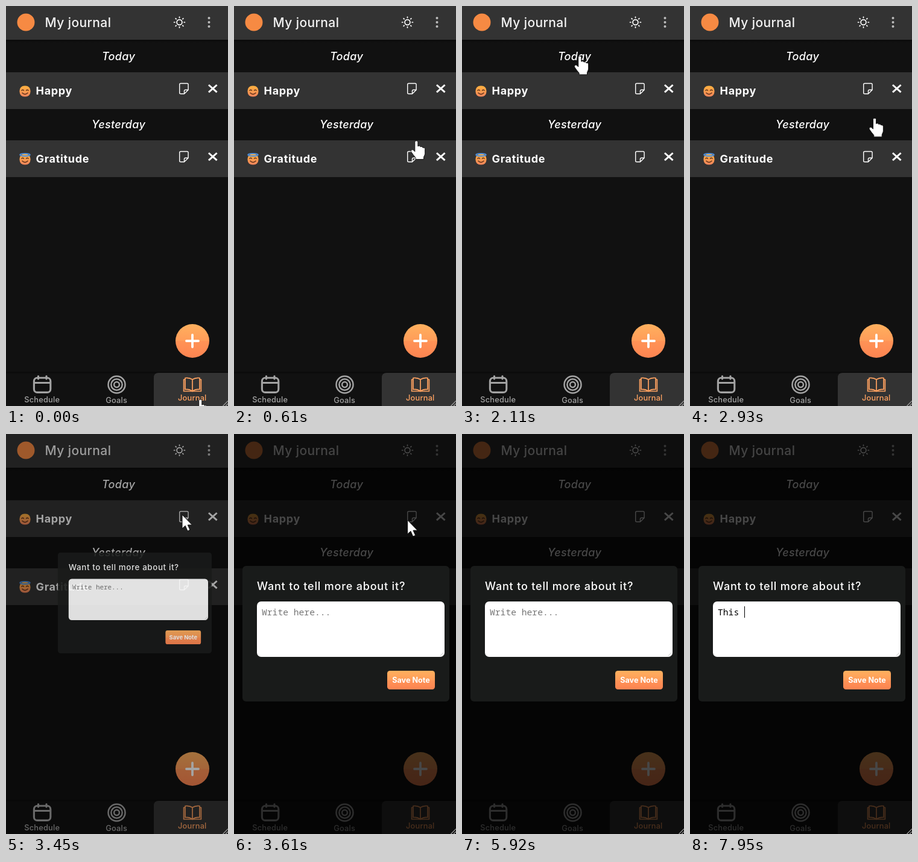
An HTML page that plays this animation: 368x664 px, repeating every 8000 ms.

```html
<!DOCTYPE html>
<html lang="en">
<head>
<meta charset="utf-8">
<title>Journal</title>
<style>
  html, body { margin: 0; width: 100%; height: 100%; overflow: hidden; background: #111; }
  svg { display: block; width: 100vw; height: 100vh; }
  text { font-family: Inter, "Open Sans", sans-serif; font-weight: 500; fill: #fff; }
  .title { font-size: 21px; letter-spacing: .4px; fill: #f4f4f4; }
  .day { font-size: 18px; font-style: italic; letter-spacing: .3px; text-anchor: middle; }
  .mood { font-size: 18px; font-weight: 700; letter-spacing: .7px; }
  .tab { font-size: 12.8px; letter-spacing: .2px; text-anchor: middle; fill: #a3a3a3; }
  .ask { font-size: 18px; letter-spacing: .82px; }
  .save { font-size: 12.6px; font-weight: 700; text-anchor: middle; }
  .mono { font-family: "Noto Sans Mono", "DejaVu Sans Mono", monospace; font-size: 14.667px; font-weight: 400; }
  .line { fill: none; stroke: #fff; }
</style>
</head>
<body>
<svg viewBox="0 0 368 664" xmlns="http://www.w3.org/2000/svg">
  <defs>
    <linearGradient id="warm" x1="0" y1="0" x2="0" y2="1">
      <stop offset="0" stop-color="#ffb05e"/>
      <stop offset=".5" stop-color="#ff9c59"/>
      <stop offset=".5" stop-color="#ff9356"/>
      <stop offset="1" stop-color="#fd8451"/>
    </linearGradient>
    <linearGradient id="skin" x1="0" y1="0" x2="0" y2="1">
      <stop offset="0" stop-color="#fdb23f"/>
      <stop offset="1" stop-color="#f3845c"/>
    </linearGradient>
    <linearGradient id="shade" x1="0" y1="0" x2="0" y2="1">
      <stop offset="0" stop-color="#000" stop-opacity=".4"/>
      <stop offset="1" stop-color="#000" stop-opacity="0"/>
    </linearGradient>
    <path id="cross" class="line" stroke-width="3" d="M336 131L349.6 143.2M349.6 131L336 143.2"/>
    <path id="note" class="line" stroke-width="1.4" stroke-linejoin="round" d="M295.5 145.7H289.5Q287.7 145.7 287.7 143.9V130.3Q287.7 128.5 289.5 128.5H300.3Q302.1 128.5 302.1 130.3V139.2L295.5 145.7V141Q295.5 139.2 297.3 139.2H302.1"/>
    <g id="face">
      <rect x="22.5" y="132.5" width="18" height="18" rx="8" fill="url(#skin)"/>
      <g fill="none" stroke="#5a2d17" stroke-width="1.4" stroke-linecap="round">
        <path d="M26 140.2q1.7-2.2 3.4 0M33.6 140.2q1.7-2.2 3.4 0M27 144.3q4.5 4.4 9 0"/>
      </g>
    </g>
    <path id="bar" d="M-6-11.5H-2Q0-11.5 0-10Q0-11.5 2-11.5H6M0-10V10M-6 11.5H-2Q0 11.5 0 10Q0 11.5 2 11.5H6"/>
  </defs>

  <rect width="368" height="664" fill="#111"/>
  <rect y="56" width="368" height="5" fill="url(#shade)"/>
  <rect width="368" height="56" fill="#333"/>
  <circle cx="33" cy="27" r="14.5" fill="#f68a43"/>
  <text class="title" x="64.5" y="35">My journal</text>
  <g class="line" stroke-width="1.7" stroke-linecap="round">
    <circle cx="287.5" cy="27" r="4.4"/>
    <g id="rays"></g>
  </g>
  <g fill="#bdbdbd">
    <circle cx="336.5" cy="20" r="2"/><circle cx="336.5" cy="27" r="2"/><circle cx="336.5" cy="34" r="2"/>
  </g>

  <text class="day" x="186.5" y="90">Today</text>
  <text class="day" x="186.5" y="203">Yesterday</text>
  <rect y="110" width="368" height="61" fill="#333"/>
  <rect y="223" width="368" height="61" fill="#333"/>
  <use href="#face"/>
  <use href="#face" y="113"/>
  <ellipse cx="31.5" cy="247" rx="8.3" ry="2.1" fill="none" stroke="#4d8fdc" stroke-width="2"/>
  <text class="mood" x="49.5" y="147">Happy</text>
  <text class="mood" x="49.5" y="260">Gratitude</text>
  <use href="#note"/><use href="#note" y="113"/>
  <use href="#cross"/><use href="#cross" y="113"/>

  <circle cx="309" cy="556" r="28" fill="url(#warm)"/>
  <path class="line" stroke-width="3.8" stroke-linecap="round" d="M299 556H319M309 546V566"/>

  <rect y="607" width="368" height="3" fill="#0c0c0c"/>
  <path d="M245 664V617Q245 609 253 609H368V664Z" fill="#333"/>
  <g fill="none" stroke="#a3a3a3" stroke-width="3.1" stroke-linecap="round">
    <rect x="46.4" y="617.2" width="27.4" height="24.2" rx="5.5"/>
    <path d="M47 625.5H73M53.5 614.5V619M67 614.5V619"/>
    <g stroke-width="2.5">
      <circle cx="183.5" cy="628.5" r="14"/><circle cx="183.5" cy="628.5" r="9.2"/><circle cx="183.5" cy="628.5" r="4.4"/>
    </g>
  </g>
  <g fill="none" stroke="#ffa261" stroke-width="1.7" stroke-linejoin="round">
    <path d="M309 620Q304 616.5 297 617.5V636.5Q304 635.5 309 639.5Q314 635.5 321 636.5V617.5Q314 616.5 309 620V639"/>
    <path d="M297 620H294.6V639.5H323.4V620H321"/>
  </g>
  <text class="tab" x="59.7" y="658">Schedule</text>
  <text class="tab" x="183.2" y="659">Goals</text>
  <text class="tab" x="308.8" y="655" style="fill:#ffa261">Journal</text>

  <rect id="dim" width="368" height="664" fill="#000"/>
  <path d="M359.5 664L368 655.5M364 664L368 660" stroke="#a0a0a0" stroke-width="1.2"/>

  <g id="dialog">
    <rect x="14" y="219" width="343" height="225" rx="6" fill="#191b1a"/>
    <text class="ask" x="38" y="259">Want to tell more about it?</text>
    <rect x="38" y="278" width="311" height="92" rx="7" fill="#fff"/>
    <path d="M341.5 368.5L347.5 362.5M345 368.5L347.5 366" stroke="#bbb" stroke-width=".8"/>
    <text id="entry" class="mono" x="46" y="301"></text>
    <rect id="caret" x="90" y="286" width="1" height="19" fill="#000"/>
    <rect x="254" y="393" width="79" height="31" rx="4.5" fill="url(#warm)"/>
    <text class="save" x="293.5" y="413">Save Note</text>
  </g>

  <g id="cursor" fill="#fff" stroke="#111" stroke-width="1" stroke-linejoin="round">
    <path id="hand" d="M-2.3 2.3C-2.3-.6 2.8-.6 2.8 2.3V9.2C4.3 7.9 6.6 8.5 7 10.2C8.5 9.2 10.5 10 10.8 11.6C12.6 10.9 14.6 12 14.6 14V21C14.6 24 12.4 25.8 12.4 28V31H-1V28.3C-3.5 25.5-6 22-8.2 18.8C-9.8 16.2-6.9 13.7-4.6 15.7L-2.3 18Z"/>
    <path id="arrow" d="M0 0V23L5.2 18.3L9 27L13 25.3L9.3 17H16.5Z"/>
    <g id="beam" fill="none">
      <use href="#bar" stroke-width="3"/>
      <use href="#bar" stroke="#fff" stroke-width="1.5"/>
    </g>
  </g>
</svg>
<script>
  const LOOP = 8000;
  const OPEN = 3336, OPEN_TIME = 233;
  const BUTTON = [294.5, 132];
  const DIM = .72;
  const CHAR = 8.8;
  const keys = [[7330, "T"], [7540, "h"], [7700, "i"], [7870, "s"], [7950, " "]];

  // Pointer stops: time, x, y
  const path = [
    [0, 322, 653], [810, 289, 147], [1230, 166, 188], [1400, 162, 201],
    [1660, 169, 197], [2110, 195, 83], [2250, 207, 80], [2510, 271, 103],
    [2900, 306, 187], [3320, 292, 134], [3520, 292, 134], [4040, 239, 245]
  ];

  const $ = id => document.getElementById(id);
  const clamp = v => Math.min(1, Math.max(0, v));
  const show = (id, on) => $(id).setAttribute("visibility", on ? "visible" : "hidden");

  $("rays").innerHTML = Array.from({ length: 8 }, (_, i) =>
    `<path d="M0 -7.6V-9" transform="translate(287.5 27) rotate(${i * 45})"/>`).join("");

  function slope(i, axis) {
    const a = path[i - 1], b = path[i], c = path[i + 1];
    if (!a || !c) return 0;
    const before = (b[axis] - a[axis]) / (b[0] - a[0]);
    const after = (c[axis] - b[axis]) / (c[0] - b[0]);
    // Flat at turning points, so the pointer never overshoots a stop
    return before * after <= 0 ? 0 : 2 * before * after / (before + after);
  }

  function pointer(t, axis) {
    const last = path.length - 1;
    if (t >= path[last][0]) return path[last][axis];
    const i = path.findIndex(p => p[0] > t) - 1;
    const a = path[i], b = path[i + 1];
    const d = b[0] - a[0], u = (t - a[0]) / d, v = 1 - u;
    return v * v * (1 + 2 * u) * a[axis] + u * u * (3 - 2 * u) * b[axis]
      + d * u * v * (v * slope(i, axis) - u * slope(i + 1, axis));
  }

  function drawDialog(t) {
    const p = clamp((t - OPEN) / OPEN_TIME);
    const scale = 1 - (1 - p) ** 2;
    const [x, y] = BUTTON;
    $("dim").setAttribute("opacity", DIM * p);
    $("dialog").setAttribute("opacity", 1 - (1 - p) ** 3);
    $("dialog").setAttribute("transform", `translate(${x} ${y}) scale(${scale}) translate(${-x} ${-y})`);
  }

  function drawEntry(t) {
    const typed = keys.filter(k => k[0] <= t).map(k => k[1]).join("");
    $("entry").textContent = typed || "Write here...";
    $("entry").style.fill = typed ? "#000" : "#757575";
    $("caret").setAttribute("x", 46 + typed.length * CHAR);
    show("caret", (t >= 6020 && t < 6550) || t >= 7100);
  }

  function drawCursor(t) {
    const beam = t >= 4570 && t < 5150;
    const x = beam ? 240 : pointer(t, 1), y = beam ? 246.5 : pointer(t, 2);
    $("cursor").setAttribute("transform", `translate(${x} ${y})`);
    show("hand", t < OPEN);
    show("arrow", t >= OPEN && t < 4570);
    show("beam", beam);
  }

  function draw(t) {
    drawDialog(t);
    drawEntry(t);
    drawCursor(t);
  }

  const start = performance.now();
  function tick() {
    draw((performance.now() - start) % LOOP);
    requestAnimationFrame(tick);
  }
  tick();
</script>
</body>
</html>
```
